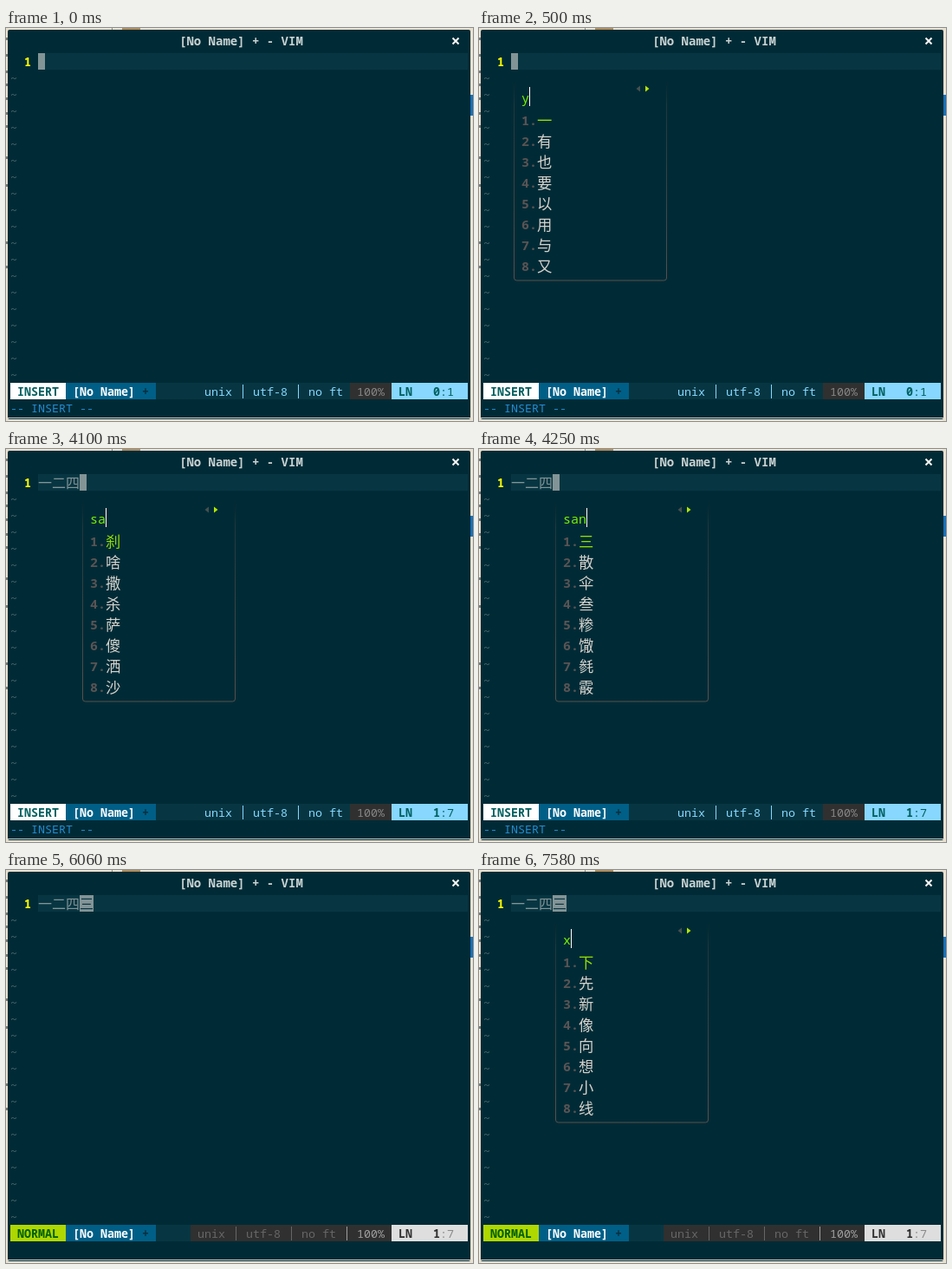
An HTML page for the animation above (8 s loop, 539 by 453 pixels).

```html
<!DOCTYPE html>
<html lang="en">
<head>
<meta charset="utf-8">
<title>Vim input method</title>
<style>
html, body { margin: 0; width: 100%; height: 100%; overflow: hidden; background: #e9e1d0; }
svg { display: block; }
text { font-family: "Noto Sans Mono", "Noto Sans CJK SC", "Noto Sans CJK", monospace; white-space: pre; }
.cjk { font-family: "Noto Sans CJK SC", "Noto Sans CJK", sans-serif; }
</style>
</head>
<body>
<svg id="stage" width="539" height="453" viewBox="0 0 539 453">
  <defs>
    <linearGradient id="edge" gradientUnits="userSpaceOnUse" x1="0" y1="62" x2="0" y2="292">
      <stop offset="0" stop-color="#05272f"/>
      <stop offset=".12" stop-color="#20383d"/>
      <stop offset="1" stop-color="#5a504d"/>
    </linearGradient>
  </defs>
  <g id="frame"></g>
  <g id="screen"></g>
</svg>
<script>
const LOOP = 8000, CELL = 8, LINE = 19;
const $ = id => document.getElementById(id);

const rect = (x, y, w, h, fill) =>
  `<rect x="${x}" y="${y}" width="${w}" height="${h}" fill="${fill}"/>`;
const text = (x, y, str, fill, { size = 13.333, weight = 400, cls = '' } = {}) =>
  `<text x="${x}" y="${y}" fill="${fill}" font-size="${size}" font-weight="${weight}" class="${cls}">${str}</text>`;
const bold = (x, y, str, fill, size) => text(x, y, str, fill, { size, weight: 700 });
const cjk = (x, y, str, fill, size) => text(x, y, str, fill, { size, cls: 'cjk' });

function drawFrame() {
  let out = rect(0, 0, 539, 453, '#e9e1d0');
  out += rect(122, 0, 1, 2, '#8f8a80') + rect(134, 0, 21, 2, '#b08d5c');
  out += rect(535, 77, 4, 24, '#1a6fb5');
  for (const y of [11, 30, 49, 64, 80, 97, 112, 148, 180, 246, 274])
    out += rect(0, y, 2, 3, '#777872');
  out += '<rect x="2" y="2" width="534" height="449" rx="2" fill="#002b36"/>';
  out += rect(2, 449, 534, 1, '#c9d3d2');
  out += bold(200, 20, '[No Name] + - VIM', '#c9d2d2', 14);
  out += '<path d="M515.5 11.5l7 7m0-7l-7 7" stroke="#f4f4f4" stroke-width="2"/>';
  out += rect(37, 29, 496, LINE, '#073642') + bold(21, 44, '1', '#ffff00');
  for (let i = 1; i < 20; i++) out += text(5, 44 + LINE * i, '~', '#4d6b75');
  $('frame').innerHTML = out;
}

function statusBar(normal, row, col) {
  const y = 424, bar = (x, w, fill) => rect(x, 409, w, LINE, fill);
  const ink = normal ? '#303030' : '#005f5f';
  const info = normal ? '#666666' : '#87d7ff';
  const x = normal ? 221 : 229;
  let out = bar(173, 360, '#073642') + bar(5, 64, normal ? '#afd700' : '#ffffff');
  out += bold(13, y, normal ? 'NORMAL' : 'INSERT', normal ? '#005f00' : ink);
  out += bar(69, 104, '#005f87') + bold(77, y, '[No Name]', '#ffffff') + bold(157, y, '+', '#06303f');
  out += normal ? bar(213, 232, '#303030') : bar(397, 48, '#303030');
  out += text(x, y, 'unix', info) + text(x + 56, y, 'utf-8', info) + text(x + 120, y, 'no ft', info);
  const divider = (cx, fill) => rect(cx, 411, 1, 16, fill);
  out += divider(x + 44, info) + divider(x + 108, info);
  if (normal) out += divider(393, '#9e9e9e');
  out += text(405, y, '100%', normal ? '#9e9e9e' : '#858585');
  out += bar(445, 88, normal ? '#dedede' : '#87d7ff') + bold(453, y, 'LN', ink);
  out += bold(493, y, row, ink) + text(501, y, ':' + col, normal ? '#8a8a8a' : ink);
  if (!normal) out += text(5, 443, '-- INSERT --', '#268bd2');
  return out;
}

function popup(left, typed, words) {
  const x = left + 9, caret = x + typed.length * 9;
  let out = rect(left, 60, 177, 231, '#002b36');
  out += `<path d="M${left + .5} 62V288q0 3 3 3h170q3 0 3-3V62" fill="none" stroke="url(#edge)"/>`;
  out += `<path d="M${left + 146} 66.5v7l-4.5-3.5z" fill="#46504f"/>`;
  out += `<path d="M${left + 152} 66.5v7l4.5-3.5z" fill="#b4e600"/>`;
  out += text(x, 86, typed, '#78f000', { size: 15 }) + rect(caret, 68, 1, 22, '#ffffff');
  words.split(' ').forEach((word, i) => {
    const y = 111.5 + 24 * i;
    out += text(x, y, `${i + 1}.`, '#5a5454', { size: 15, weight: 600 });
    out += cjk(x + 18, y + 1, word, i ? '#d6d3cd' : '#92df00', 17.333);
  });
  return out;
}

function screen({ doc = '', normal = false, typed, words }) {
  const chars = doc.length - (normal ? 1 : 0);
  const end = 37 + chars * 2 * CELL;
  let out = cjk(37, 44.5, doc.slice(0, chars), '#839496', 16);
  out += rect(end, 29, normal ? 16 : 8, LINE, '#839496');
  if (normal) out += cjk(end, 44.5, doc[chars], '#073642', 16);
  // Two columns per character of the line plus the cursor's own.
  out += statusBar(normal, doc ? 1 : 0, chars * 2 + 1);
  if (typed) out += popup(doc ? 88 : 40, typed, words);
  return out;
}

const steps = [
  { at: 0 },
  { at: 500, typed: 'y', words: '一 有 也 要 以 用 与 又' },
  { at: 590, typed: 'yi', words: '一 以 已 意 亿 易 艺 益' },
  { at: 920, typed: 'yi er', words: '一二 伊尔 已而 艺尔 以 已 一 益' },
  { at: 4100, doc: '一二四', typed: 'sa', words: '刹 啥 撒 杀 萨 傻 洒 沙' },
  { at: 4250, doc: '一二四', typed: 'san', words: '三 散 伞 叁 糁 馓 毵 霰' },
  { at: 4750, doc: '一二四三' },
  { at: 6060, doc: '一二四三', normal: true },
  { at: 7580, doc: '一二四三', normal: true, typed: 'x', words: '下 先 新 像 向 想 小 线' },
];

let shown;
function tick() {
  const t = performance.now() % LOOP;
  const step = steps.findLast(s => s.at <= t);
  if (step !== shown) $('screen').innerHTML = screen(shown = step);
  requestAnimationFrame(tick);
}

drawFrame();
tick();
</script>
</body>
</html>
```
